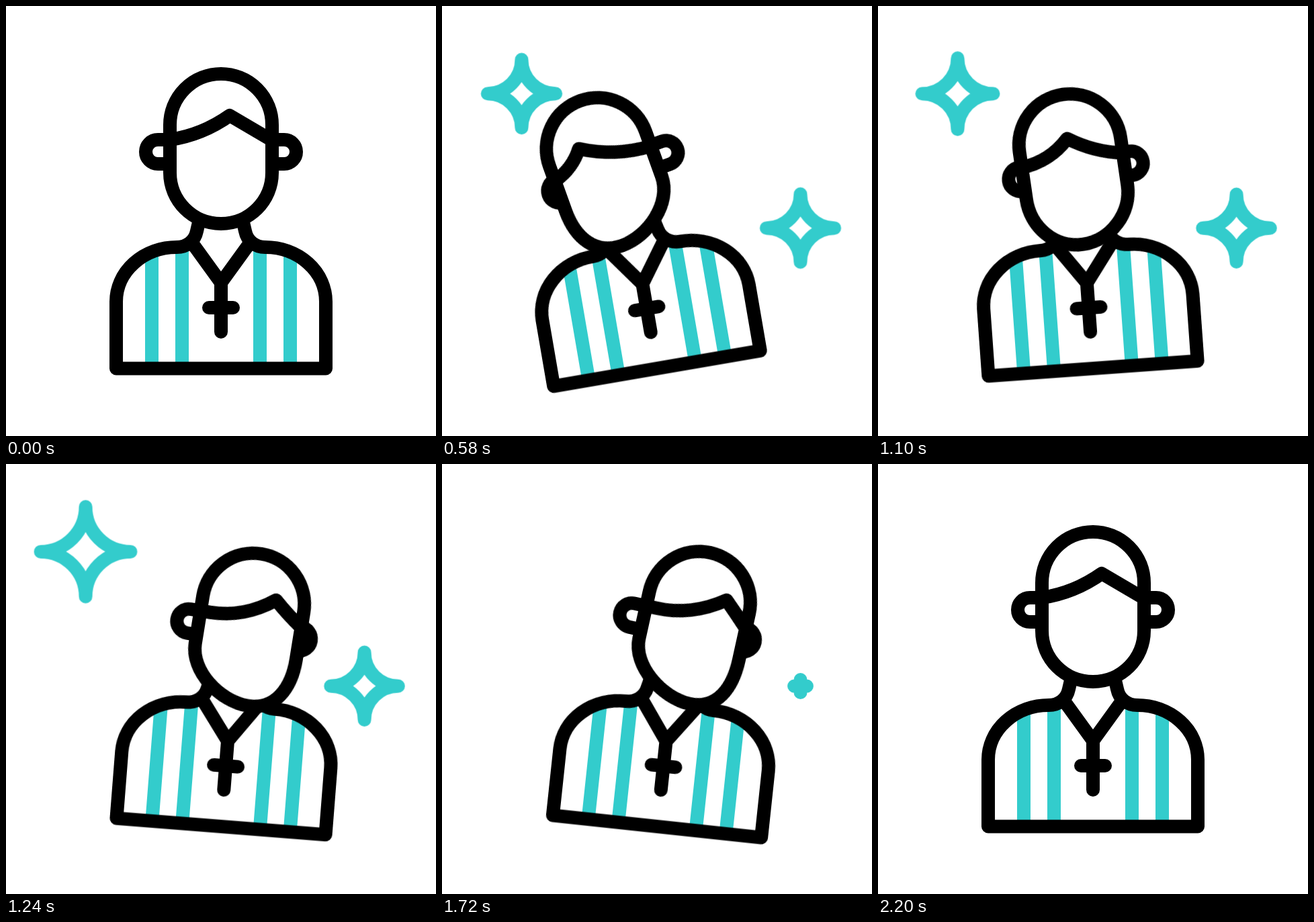
These frames come from a looping animation (640 px wide and 640 px high, 2.4 s). An HTML page:

```html
<!DOCTYPE html>
<html lang="en">
<head>
<meta charset="utf-8">
<title>Swaying figure with sparkles</title>
<style>
  html, body { margin: 0; width: 100%; height: 100%; overflow: hidden; background: #fff; }
  svg { display: block; width: 100vw; height: 100vh; }

  .ink, .star, .stripes { fill: none; stroke-width: 20; }
  .ink { stroke: #000; stroke-linecap: round; stroke-linejoin: round; }
  .star, .stripes { stroke: #3cc; }
  .star { stroke-linejoin: round; vector-effect: non-scaling-stroke; }
  .face { fill: #fff; }

  .body, .head, .face, .hair, .ear {
    animation: 2.4s cubic-bezier(.65, 0, .35, 1) infinite;
  }
  .body { transform-origin: 320px 539.5px; animation-name: sway; }
  .head { animation-name: nod; }
  .face { animation-name: jaw; }
  .hair { animation-name: fringe; }
  .ear.l { animation-name: ear-l; }
  .ear.r { animation-name: ear-r; }
  .star { animation: twinkle 2.4s cubic-bezier(.333, 0, .667, 1) infinite backwards; }
  .star.late { animation-delay: .267s; }

  @keyframes sway {
    0%, 91.667%, 100% { transform: rotate(0deg); }
    33.333% { transform: rotate(-10.7deg); }
    61.125% { transform: rotate(7.3deg); }
  }
  @keyframes nod {
    0%, 91.667%, 100% { transform: translate(320px, 177px) rotate(0deg); }
    33.333% { transform: translate(285px, 204.7px) rotate(-11deg); }
    61.125% { transform: translate(352.6px, 206.3px) rotate(7.6deg); }
  }
  @keyframes jaw {
    0%, 91.667%, 100% { d: path("M-76 71V0A76 76 0 0 1 76 0V71C76 113 42 147 0 147C-42 147 -76 113 -76 71Z"); }
    33.333% { d: path("M-76 71V0A76 76 0 0 1 76 0V71C76 113 26 148 -16 148C-58 148 -76 113 -76 71Z"); }
    61.125% { d: path("M-76 71V0A76 76 0 0 1 76 0V71C76 113 64 151 22 151C-20 151 -76 113 -76 71Z"); }
  }
  @keyframes fringe {
    0%, 91.667%, 100% { d: path("M-76 22Q-28 15 13 -14Q44.5 4.5 76 23"); }
    33.333% { d: path("M-76 24Q-46 15 -30 -9Q19 22 76 23"); }
    61.125% { d: path("M-76 21Q-11 29 44 -12Q60 5 76 23"); }
  }
  @keyframes ear-l {
    0%, 61.125%, 100% { transform: translateX(0); }
    33.333% { transform: translateX(22px); }
  }
  @keyframes ear-r {
    0%, 33.333%, 91.667%, 100% { transform: translateX(0); }
    61.125% { transform: translateX(-22px); }
  }
  @keyframes twinkle {
    0%, 5.556%, 63.2%, 100% { transform: scale(0); }
    16.667%, 52.083% { transform: scale(1); }
    25%, 43.75% { transform: scale(.75); }
  }
</style>
</head>
<body>
<svg viewBox="0 0 640 640">
  <defs>
    <path id="spark" d="M0 -67A67 67 0 0 0 67 0A67 67 0 0 0 0 67A67 67 0 0 0 -67 0A67 67 0 0 0 0 -67Z"/>
  </defs>

  <g transform="translate(118.5 130.5)">
    <path class="star" d="M0 -67A67 67 0 0 0 67 0A67 67 0 0 0 0 67A67 67 0 0 0 -67 0A67 67 0 0 0 0 -67Z"/>
  </g>
  <g transform="translate(533.5 330.5)">
    <path class="star late" d="M0 -67A67 67 0 0 0 67 0A67 67 0 0 0 0 67A67 67 0 0 0 -67 0A67 67 0 0 0 0 -67Z"/>
  </g>

  <g class="body">
    <path class="stripes" d="M217 372V539M262 362V539M378 362V539M423 372V539"/>
    <g class="ink">
      <path d="M287 322L284 335C281 350 269 359 254 359A90 81 0 0 0 164 440V539.5H476V440A90 81 0 0 0 386 359C371 359 359 350 356 335L353 322"/>
      <path d="M278 354L320 412L362 354M320 412V485M302 449H338"/>
    </g>
    <g class="head">
      <path class="ink ear l" d="M-76 22H-94A18 18 0 0 0 -94 58H-76"/>
      <path class="ink ear r" d="M76 22H94A18 18 0 0 1 94 58H76"/>
      <path class="ink face" d="M-76 71V0A76 76 0 0 1 76 0V71C76 113 42 147 0 147C-42 147 -76 113 -76 71Z"/>
      <path class="ink hair" d="M-76 22Q-28 15 13 -14Q44.5 4.5 76 23"/>
    </g>
  </g>
</svg>
</body>
</html>
```
